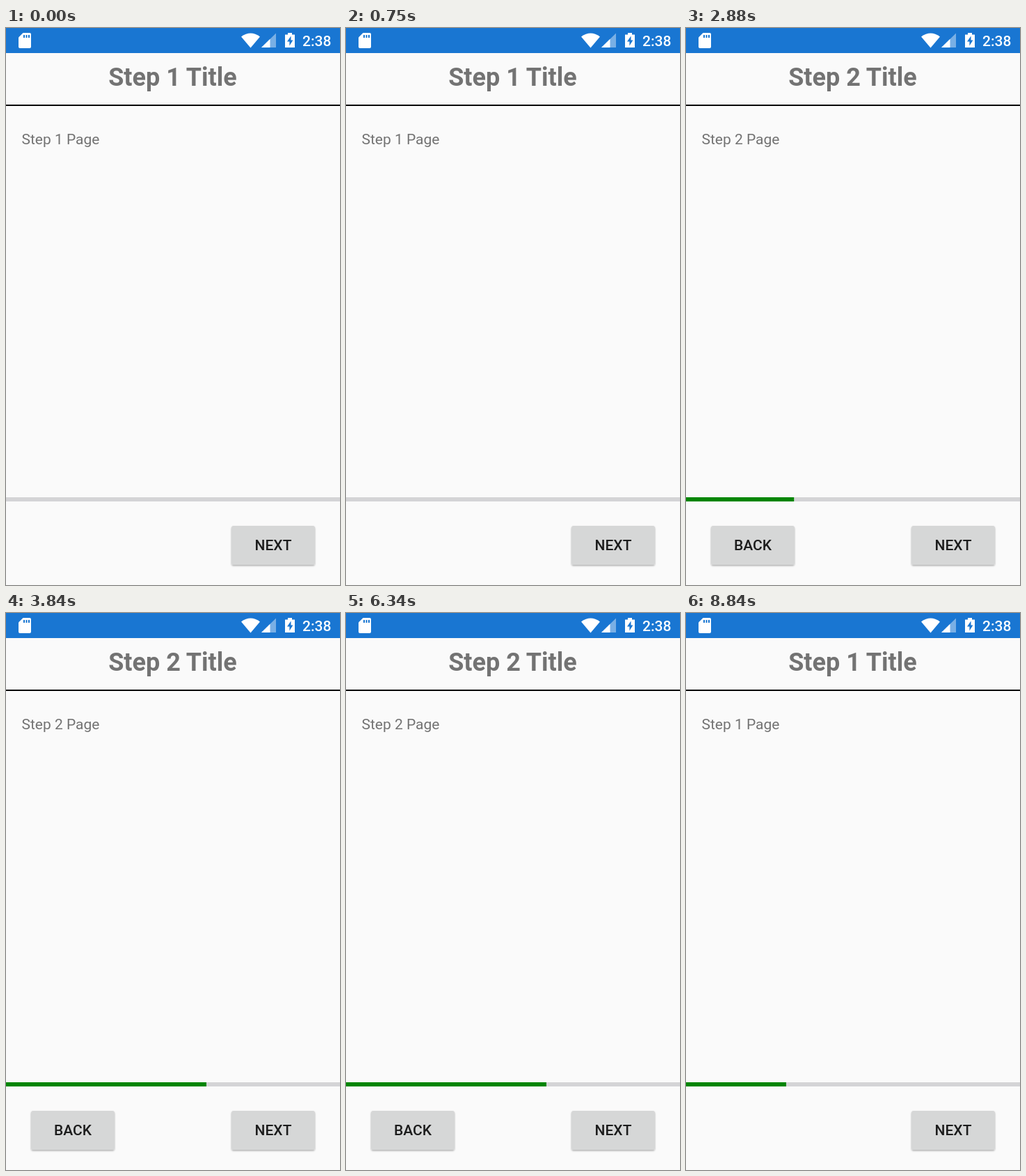
Write an HTML page that moves like this. It is 480 px wide and 800 px high and loops after 9.21 s.

```html
<!DOCTYPE html>
<html lang="en">
<head>
<meta charset="utf-8">
<title>Step wizard</title>
<style>
  html, body { margin: 0; width: 100%; height: 100%; overflow: hidden; background: #fafafa; }
  svg { display: block; width: 100vw; height: 100vh; font-family: Roboto, sans-serif; }
  .label { font-size: 21px; font-weight: 500; text-anchor: middle; fill: #1c1c1c; }
  .face { fill: #d6d7d7; filter: url(#shadow); }
</style>
</head>
<body>
<svg viewBox="0 0 480 800">
  <defs>
    <filter id="shadow" x="-10%" y="-15%" width="120%" height="140%">
      <feDropShadow dx="0" dy="1.5" stdDeviation="1.3" flood-color="#000" flood-opacity=".3"/>
    </filter>
  </defs>

  <rect width="480" height="800" fill="#fafafa"/>

  <rect width="480" height="36" fill="#1976d2"/>
  <g fill="#fff">
    <path d="M24.5 7H34q2 0 2 2V27q0 2-2 2H20q-2 0-2-2V13.5Z"/>
    <path d="M25 10h2v4h-2zm3.5 0h2v4h-2zm3.5 0h2v4h-2z" fill="#1976d2"/>
    <path d="M338 12.5Q351.500 2.500 365 12.500L351.500 28.500Z"/>
    <path d="M388 7.500V28H367Z" opacity=".42"/>
    <path d="M379.500 15.800V28H367Z"/>
    <path d="M405 7h6v2.500h4V28h-14V9.500h4Z"/>
    <path d="M409.500 11.500L404 19.500h3.400V25.500l5-8H409.500Z" fill="#1976d2"/>
    <text x="426" y="26" font-size="21" font-weight="500">2:38</text>
  </g>

  <text id="title" x="239.5" y="83" font-size="36" font-weight="700" text-anchor="middle" fill="#737373"></text>
  <rect y="110" width="480" height="2" fill="#000"/>
  <text id="page" x="22.5" y="167" font-size="21" fill="#737373"></text>

  <rect y="674" width="480" height="6" fill="#d4d4d6"/>
  <rect id="bar" y="674" height="6" fill="#008500"/>

  <g id="back" transform="translate(36 715)">
    <rect class="face" width="120" height="56" rx="3"/>
    <text class="label" x="60" y="35">BACK</text>
  </g>
  <g transform="translate(324 715)">
    <rect class="face" width="120" height="56" rx="3"/>
    <text id="next" class="label" x="60" y="35"></text>
  </g>
</svg>
<script>
const LOOP = 9210;
const FILL = 540;

// A newly opened page fills its bar from empty; going back shows it as it was left.
const views = [
  { at: 0, step: 1, progress: 0 },
  { at: 2590, step: 2, progress: .6, fills: true },
  { at: 4340, step: 3, progress: 1, fills: true },
  { at: 6090, step: 2, progress: .6 },
  { at: 7710, step: 1, progress: .3 }
];

const $ = id => document.getElementById(id);

function setText(id, text) {
  if ($(id).textContent !== text) $(id).textContent = text;
}

function draw(t) {
  const { at, step, progress, fills } = views.findLast(v => t >= v.at);
  const filled = fills ? Math.min(1, (t - at) / FILL) : 1;

  setText("title", `Step ${step} Title`);
  setText("page", `Step ${step} Page`);
  setText("next", step === 3 ? "FINISH" : "NEXT");
  $("back").setAttribute("visibility", step > 1 ? "visible" : "hidden");
  $("bar").setAttribute("width", 480 * progress * filled);
}

const begin = performance.now();
function tick() {
  draw((performance.now() - begin) % LOOP);
  requestAnimationFrame(tick);
}
tick();
</script>
</body>
</html>
```
